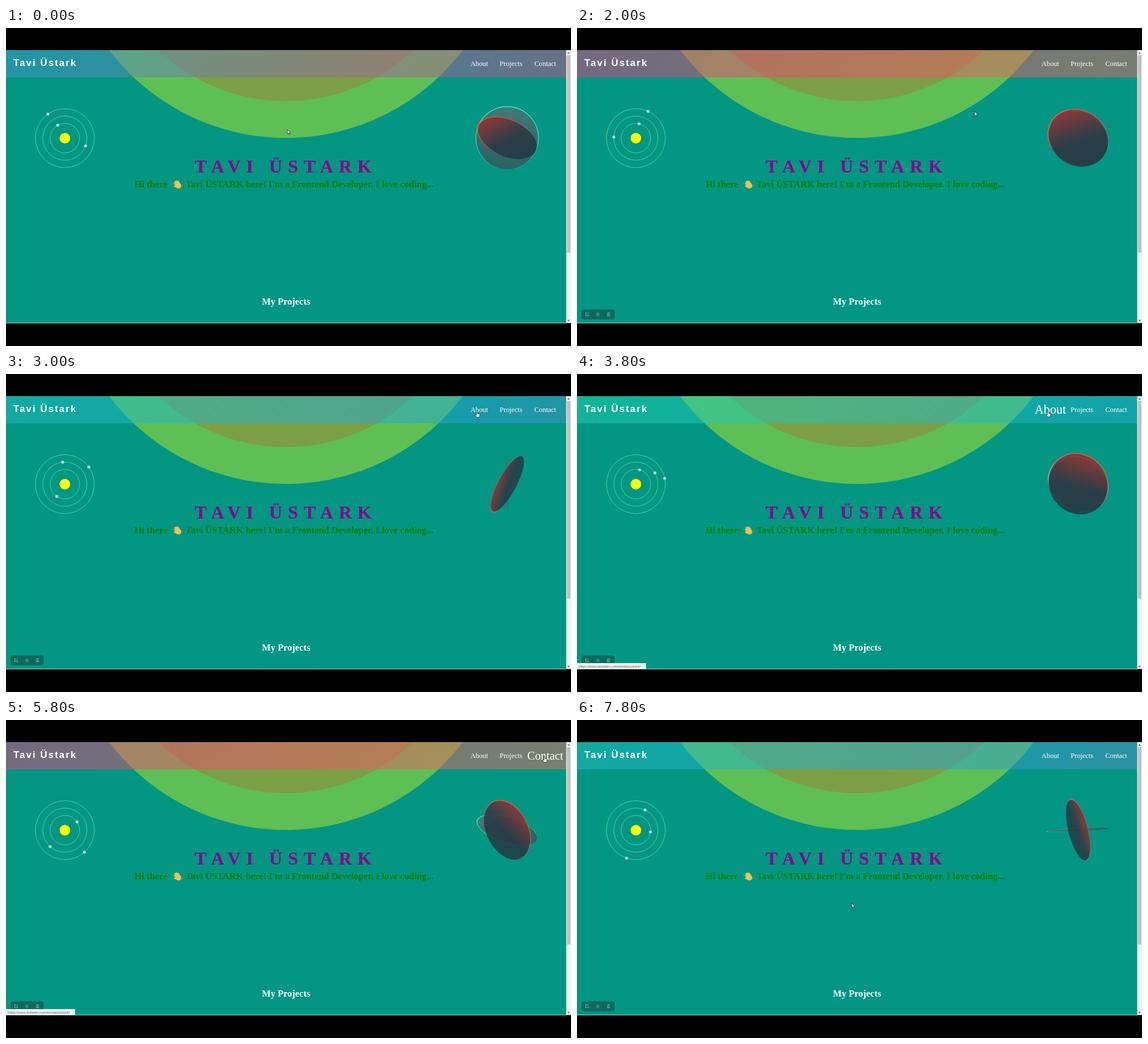
Recreate the animation shown at these times as an HTML page. Size 998 by 561 pixels, loop 8000 ms.

```html
<!DOCTYPE html>
<html lang="en">
<head>
<meta charset="utf-8">
<title>Portfolio page</title>
<style>
  html, body { margin: 0; width: 100%; height: 100%; overflow: hidden; background: #000; }
  svg { display: block; width: 100vw; height: 100vh; }
  text { font-family: "Liberation Serif", "Times New Roman", serif; }
  .sans { font-family: "Liberation Sans", Arial, sans-serif; }
  .bold { font-weight: bold; font-size: 16.5px; }
  .nav { font-size: 12.4px; fill: #fff; text-anchor: middle; }
</style>
</head>
<body>
<svg viewBox="0 0 998 561">
  <defs>
    <clipPath id="page"><rect y="39" width="990" height="482"/></clipPath>
    <linearGradient id="barFill" gradientUnits="userSpaceOnUse" x1="0" y1="0" x2="2074" y2="2074">
      <stop stop-color="#23d5ab"/>
      <stop offset=".3333" stop-color="#23a6d5"/>
      <stop offset=".6667" stop-color="#e73c7e"/>
      <stop offset="1" stop-color="#ee7752"/>
    </linearGradient>
    <linearGradient id="tealFill" x2="0" y2="1">
      <stop stop-color="#5a6e73" stop-opacity=".72"/>
      <stop offset="1" stop-color="#374f54" stop-opacity=".72"/>
    </linearGradient>
    <linearGradient id="tealEdge" x2="0" y2="1">
      <stop stop-color="#40e6c8"/>
      <stop offset=".55" stop-color="#40e6c8" stop-opacity=".7"/>
      <stop offset="1" stop-color="#40e6c8" stop-opacity=".1"/>
    </linearGradient>
    <linearGradient id="redFill" x2="0" y2="1">
      <stop stop-color="#96302f" stop-opacity=".88"/>
      <stop offset=".55" stop-color="#293541" stop-opacity=".84"/>
      <stop offset="1" stop-color="#233640" stop-opacity=".82"/>
    </linearGradient>
    <linearGradient id="redEdge" x2="0" y2="1">
      <stop stop-color="#f0584f"/>
      <stop offset=".45" stop-color="#e8605a" stop-opacity=".75"/>
      <stop offset=".75" stop-color="#e8605a" stop-opacity="0"/>
    </linearGradient>
  </defs>

  <rect width="998" height="561"/>
  <g clip-path="url(#page)">
    <rect y="39" width="990" height="482" fill="#029683"/>
    <circle cx="494.5" cy="-198" r="392" fill="#5ebf54"/>
    <circle cx="494.5" cy="-198" r="327" fill="#7c9f46"/>
    <rect y="39" width="990" height="48" fill="url(#barFill)" opacity=".5"/>
    <path d="M0 520.5H990" stroke="#9fd6ce"/>
  </g>

  <text class="sans" x="13" y="67" font-size="17" font-weight="bold" letter-spacing="2" fill="#fff">Tavi Üstark</text>
  <g id="nav">
    <text class="nav" y="4">About</text>
    <text class="nav" y="4">Projects</text>
    <text class="nav" y="4">Contact</text>
  </g>

  <g transform="translate(104 194.3)" fill="none" stroke="#5fd39a" stroke-width=".9">
    <circle r="26"/><circle r="39"/><circle r="52"/>
    <circle r="9.4" fill="#ff0" stroke="none"/>
    <g id="planets" fill="#add8e6" stroke="none">
      <circle r="2.7"/><circle r="2.7"/><circle r="2.7"/>
    </g>
  </g>

  <g stroke-width="1.6">
    <circle id="tealDisc" r="55.3" fill="url(#tealFill)" stroke="url(#tealEdge)"/>
    <circle id="redDisc" r="55.3" fill="url(#redFill)" stroke="url(#redEdge)"/>
  </g>

  <text x="494.5" y="255" font-size="32" font-weight="bold" letter-spacing="10" text-anchor="middle" fill="#8b008b">TAVI ÜSTARK</text>
  <g class="bold" fill="#008000">
    <text x="227" y="281">Hi there</text>
    <text x="317" y="281">Tavi ÜSTARK here! I'm a Frontend Developer. I love coding...</text>
  </g>
  <g transform="translate(303 276.5) rotate(-32)" stroke="#fcc04a" stroke-width="2.3" stroke-linecap="round" fill="#fcc04a">
    <path d="M-3.2 1V-5M-.7 0V-7M1.8 0V-6.5M4 1V-4.5M-3 3L-6 -.5" />
    <ellipse cx=".4" cy="2.5" rx="3.8" ry="3.6"/>
    <path d="M-6.5 -6Q-5.5 -8.5 -3.5 -9M4 7.5Q6 7 7 5" fill="none" stroke="#5fa39a" stroke-width=".8"/>
  </g>
  <text class="bold" x="494.7" y="488" text-anchor="middle" fill="#fff">My Projects</text>

  <g id="toolbar">
    <rect x="8" y="496.5" width="58.5" height="17.5" rx="4" fill="#0c6a5e"/>
    <path d="M27.5 498V513M46.5 498V513" stroke="#0a5c52" stroke-width=".7"/>
    <g fill="none" stroke="#8dbab3" stroke-width=".9">
      <path d="M18 502.5H15.5V507.5H20.5V505M17.7 505.3L20.7 502.3"/>
      <path d="M35.6 502.3V507.7M38.2 502.3V507.7"/>
      <path d="M53 503H58.2M54.6 502H56.6M53.6 504.5V507.7H57.6V504.5M55.6 504.5V507"/>
    </g>
  </g>
  <g id="status">
    <rect y="510" width="122" height="10.5" fill="#eef1f1"/>
    <text class="sans" x="3" y="517.7" font-size="6.2" fill="#666">https://www.linkedin.com/in/mtaviustark/</text>
  </g>

  <rect x="989.5" y="39" width="8.5" height="481.5" fill="#f1f1f1"/>
  <rect x="990.7" y="48" width="6.3" height="348" fill="#c1c1c1"/>
  <path d="M991.5 45L993.7 42.5L996 45ZM991.5 515L993.7 517.5L996 515Z" fill="#555"/>

  <g id="cursor" fill="#fff" stroke="#111" stroke-width=".7" stroke-linejoin="round">
    <path id="arrow" d="M0 0V8L1.9 6.4 3.1 9.2 4.4 8.6 3.2 6H5.6Z"/>
    <path id="hand" d="M-.9 .7Q0 -.4 .9 .7V4L4 4.8Q5 5.2 4.8 6.5L4 10.5H-.5L-3.2 6.6Q-3 5.4 -1.8 6L-.9 7Z"/>
  </g>
</svg>

<script>
const LOOP = 8000, STEP = 200;
const $ = id => document.getElementById(id);
const clamp = v => Math.min(1, Math.max(0, v));
const rad = deg => deg * Math.PI / 180;
const show = (id, on) => $(id).setAttribute("display", on ? "inline" : "none");
const barFill = document.querySelector("#barFill");

// radius, angle at start, degrees per second
const planets = [[26, 241, 200.8], [39, 20.3, 81.3], [52, 234.5, 30]];
// center x, pointer enters, pointer leaves
const links = [[836, 3, 4.2], [892, 4.4, 5.4], [952.5, 5.6, 6.2]];
// seconds, x, y of the pointer tip
const pointer = [[0, 497, 179], [1, 497, 179], [2, 702, 147], [2.8, 832, 66], [4, 832, 65],
  [4.6, 893, 63], [5.2, 893, 63], [5.6, 951, 64], [6.1, 951, 64], [6.8, 651, 163], [7.8, 485, 323]];

// CSS "ease": cubic-bezier(.25, .1, .25, 1)
function ease(x) {
  const bezier = (u, a, b) => 3 * u * (1 - u) ** 2 * a + 3 * u * u * (1 - u) * b + u ** 3;
  let low = 0, high = 1;
  for (let i = 0; i < 20; i++) {
    const mid = (low + high) / 2;
    if (bezier(mid, .25, .25) < x) low = mid; else high = mid;
  }
  return bezier(low, .1, 1);
}

function moveBar(t) {
  const half = 2.45, phase = (t + .72) / half % 2;
  const position = phase < 1 ? ease(phase) : 1 - ease(phase - 1);
  barFill.setAttribute("gradientTransform", `translate(${-2967 * position} -33)`);
}

// Flat view of a disc turned about the axis (1, 1, 1)
function turnDisc(id, degrees) {
  const c = Math.cos(rad(degrees)), s = Math.sin(rad(degrees)) / Math.sqrt(3), k = (1 - c) / 3;
  $(id).setAttribute("transform", `matrix(${c + k} ${k + s} ${k - s} ${c + k} 885.3 194)`);
}

function movePointer(t) {
  const i = Math.max(1, pointer.findIndex(key => key[0] >= t - 1e-6));
  const [t0, x0, y0] = pointer[i - 1], [t1, x1, y1] = pointer[i];
  const u = clamp((t - t0) / (t1 - t0)), e = u * u * (3 - 2 * u);
  $("cursor").setAttribute("transform", `translate(${x0 + (x1 - x0) * e} ${y0 + (y1 - y0) * e})`);
  const overLink = t > 2.7 && t < 6.3;
  show("hand", overLink);
  show("arrow", !overLink);
}

function draw(t) {
  moveBar(t);
  planets.forEach(([r, start, speed], i) => {
    const a = rad(start + speed * t), dot = $("planets").children[i];
    dot.setAttribute("cx", r * Math.cos(a));
    dot.setAttribute("cy", r * Math.sin(a));
  });
  turnDisc("tealDisc", -.3 - 200.6 * t);
  turnDisc("redDisc", 292.5 - 164.2 * t);
  links.forEach(([x, enter, leave], i) => {
    const grow = ease(clamp((t - enter) / .4)) - ease(clamp((t - leave) / .4));
    $("nav").children[i].setAttribute("transform", `translate(${x} 63) scale(${1 + .8 * grow})`);
  });
  movePointer(t);
  show("toolbar", t > .5);
  show("status", t > 3.1 && t < 7.1);
}

function tick() {
  const ms = performance.now() % LOOP;
  draw(Math.floor(ms / STEP) * STEP / 1000);
  requestAnimationFrame(tick);
}
tick();
</script>
</body>
</html>
```
